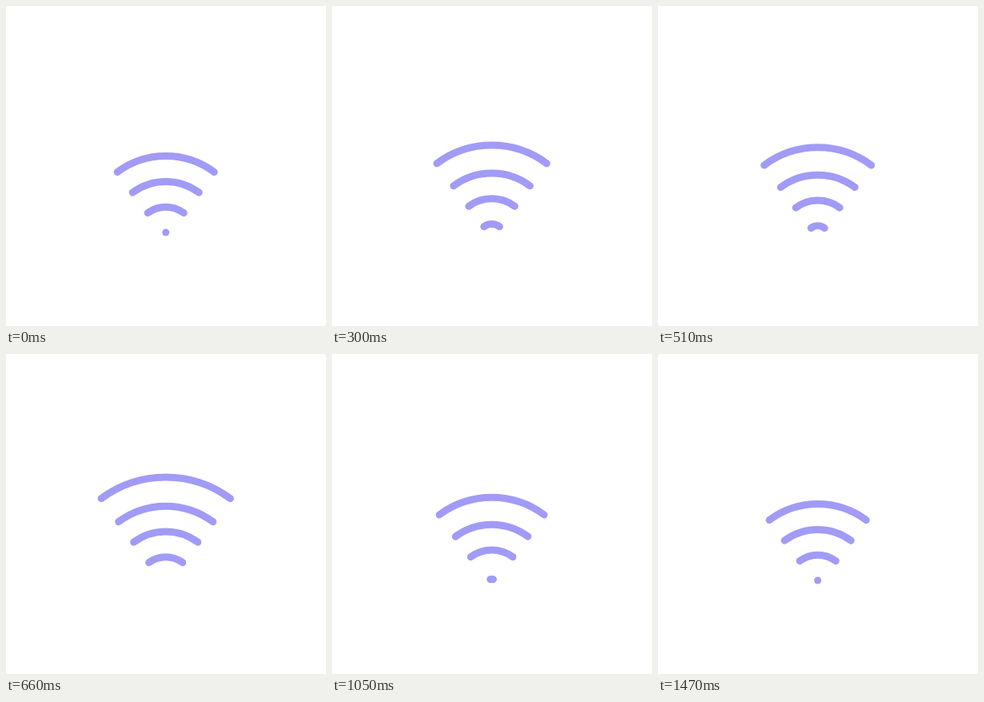
An HTML page with a canvas for the animation above (1530 ms loop, 400 by 400 pixels).

```html
<!DOCTYPE html>
<html lang="en">
<head>
<meta charset="utf-8">
<style>
  html, body { margin: 0; width: 100%; height: 100%; overflow: hidden; background: #fff; }
  canvas { display: block; width: 100vw; height: 100vh; }
</style>
</head>
<body>
<canvas width="400" height="400"></canvas>
<script>
const ctx = document.querySelector('canvas').getContext('2d');
const LOOP = 1530, TICK = 30, END = 1470;
const CX = 199.7, CY = 289, SPREAD = 0.64;
const DOT = 6, GAP = 31.8;              // radius of the dot, distance between rings
const STEP = 226, SETTLE = 3 * STEP;    // time per ring step, start of the last, springy step

// Ring steps travelled: three at constant speed, then a damped swing into the fourth
function progress(t) {
  if (t < SETTLE) return t / STEP;
  const x = t - SETTLE;
  return 4 - (1 - x / (END - SETTLE)) ** 2.55 * Math.cos(0.008 * x);
}

// Past the third stop a ring moves a little faster, then slows
function ringRadius(q) {
  const over = Math.max(0, q - 3);
  return DOT + GAP * Math.min(q, 3) + 44 * over - 8 * over * over;
}

function drawArc(radius, open) {
  const half = Math.max(SPREAD * Math.min(1, open), 0.001);
  ctx.beginPath();
  ctx.arc(CX, CY, radius, -Math.PI / 2 - half, -Math.PI / 2 + half);
  ctx.stroke();
}

function render(now) {
  const t = Math.min(Math.floor(now % LOOP / TICK) * TICK, END);
  const p = progress(t);
  ctx.fillStyle = '#fff';
  ctx.fillRect(0, 0, 400, 400);
  ctx.strokeStyle = '#a29bf6';
  ctx.lineWidth = 9;
  ctx.lineCap = 'round';

  for (let start = -3; start <= 3; start++) {
    const q = p + start;
    if (q >= 0 && q < 3.95) drawArc(ringRadius(q), 4 * q);
  }
  // The dot that stays at the bottom
  const q = p - 4;
  if (q > -0.4) drawArc(DOT + 8 * q, 2 * Math.abs(q));
}

const begin = performance.now();
function loop() {
  render(performance.now() - begin);
  requestAnimationFrame(loop);
}
loop();
</script>
</body>
</html>
```
